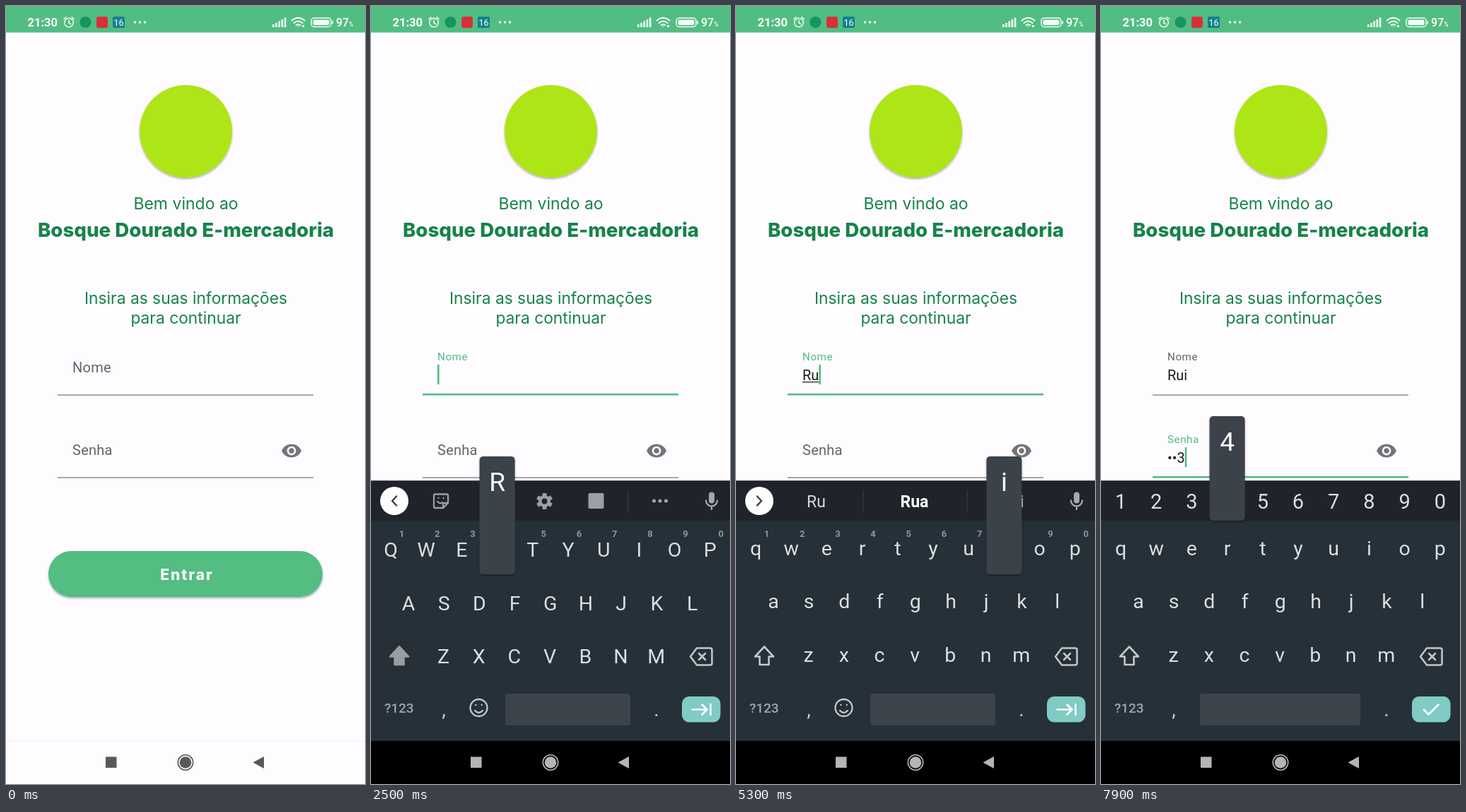
Recreate the animation shown at these times as an HTML page. Size 508 px wide and 1102 px high, loop 8000 ms.

```html
<!DOCTYPE html>
<html lang="pt-BR">
<head>
<meta charset="utf-8">
<title>Login</title>
<style>
html, body { margin: 0; width: 100%; height: 100%; overflow: hidden; background: #fefcff; }
svg { display: block; width: 508px; height: 1102px; font-family: Roboto, sans-serif; }
.brand { font-family: Inter, sans-serif; fill: #17834a; text-anchor: middle; }
.mid { text-anchor: middle; }
.line { fill: none; stroke-linecap: round; stroke-linejoin: round; }
text { white-space: pre; }
</style>
</head>
<body>
<svg viewBox="0 0 508 1102">
  <defs>
    <filter id="shadow" x="-20%" y="-20%" width="140%" height="150%">
      <feDropShadow dx="0" dy="2" stdDeviation="1.6" flood-color="#000" flood-opacity=".32"/>
    </filter>
  </defs>
  <rect width="508" height="1102" fill="#fefcff"/>

  <g id="status">
    <rect width="508" height="37.6" fill="#52bd82"/>
    <text x="30.5" y="29" font-size="16.5" font-weight="700" fill="#fff">21:30</text>
    <g class="line" stroke="#f2fff7" stroke-width="1.5">
      <circle cx="89" cy="23.5" r="6.3"/>
      <path d="M89 20v4l2.8 1.6M82 18.4l3-2.6M96 18.4l-3-2.6"/>
    </g>
    <circle cx="112.5" cy="23" r="8" fill="#15965f"/>
    <rect x="128" y="15" width="16" height="16" rx="3" fill="#d92f38"/>
    <rect x="151" y="15" width="17" height="16" rx="2" fill="#11828c"/>
    <text x="159.5" y="27.5" font-size="12.5" fill="#fff" class="mid">16</text>
    <g fill="#f2fff7">
      <circle cx="182.5" cy="23" r="1.7"/><circle cx="189.5" cy="23" r="1.7"/><circle cx="196.5" cy="23" r="1.7"/>
      <path d="M377 26h2.6v4h-2.6zM381.2 24h2.6v6h-2.6zM385.4 21.5h2.6v8.5h-2.6zM389.6 19h2.6v11h-2.6zM393.8 16.5h2.6v13.5h-2.6z"/>
    </g>
    <g class="line" stroke="#f2fff7" stroke-width="2">
      <path d="M404.5 20.5q9-7.5 18 0M407.5 24q6-5 12 0M410.5 27.2q3-2.5 6 0"/>
      <rect x="432" y="17" width="28" height="12.5" rx="4" stroke-width="1.5"/>
    </g>
    <rect x="434.5" y="19.5" width="23" height="7.5" rx="2" fill="#f2fff7"/>
    <path d="M461.5 21h1.5v4.5h-1.5zM412.3 28.5h2.4l-1.2 1.7zM419 27h3v3h-3z" fill="#f2fff7"/>
    <text x="467" y="29" font-size="16" font-weight="500" fill="#fff">97<tspan font-size="8.5">%</tspan></text>
  </g>

  <circle cx="254.5" cy="177.5" r="65.5" fill="#aee512" filter="url(#shadow)"/>
  <g class="brand">
    <text x="254.5" y="288" font-size="23">Bem vindo ao</text>
    <text x="254.5" y="326.5" font-size="27.7" font-weight="800">Bosque Dourado E-mercadoria</text>
    <text x="254.5" y="422" font-size="22.8">Insira as suas informações</text>
    <text x="254.5" y="449.5" font-size="22.8">para continuar</text>
  </g>

  <g id="fields"></g>
  <path transform="translate(388.8 614.8) scale(1.27)" fill="#757478" d="M12 4.5C7 4.5 2.73 7.61 1 12c1.73 4.39 6 7.5 11 7.5s9.27-3.11 11-7.5c-1.73-4.39-6-7.5-11-7.5zM12 17c-2.76 0-5-2.24-5-5s2.24-5 5-5 5 2.24 5 5-2.24 5-5 5zm0-8c-1.66 0-3 1.34-3 3s1.34 3 3 3 3-1.34 3-3-1.34-3-3-3z"/>

  <rect x="60" y="772" width="388" height="65" rx="32.5" fill="#52bd82" filter="url(#shadow)"/>
  <text x="256" y="813" class="brand" font-size="21" font-weight="800" letter-spacing="2" style="fill:#f7fffa">Entrar</text>
  <path d="M0 1041h508" stroke="#f0eef1"/>

  <g id="board">
    <rect y="672.6" width="508" height="430" fill="#000"/>
    <rect y="672.6" width="508" height="368.4" fill="#263038"/>
    <rect y="672.6" width="508" height="56.8" fill="#20232a"/>
    <rect id="delBg" x="432" y="889" width="70" height="63" fill="#3b434a"/>
    <g id="strip"></g>
    <g id="keys" class="mid" fill="#dbdfe1"></g>
    <path id="shift" class="line" stroke-width="2.6" d="M40 907.5L53 921.5H46.5V933H33.5V921.5H27Z"/>
    <path class="line" stroke="#c3c8ca" stroke-width="2.5" d="M461 909.5H480Q482.5 909.5 482.5 912V931Q482.5 933.5 480 933.5H461L452 921.5ZM464 917l9 9m0-9l-9 9"/>
    <text x="19" y="1000.5" font-size="19" font-weight="500" fill="#a0a6aa">?123</text>
    <g class="mid" font-size="28" fill="#c9cdcf"><text x="103" y="1006">,</text><text x="404" y="1006">.</text></g>
    <g id="smile" class="line" stroke="#c3c8ca" stroke-width="2.3">
      <circle cx="152.5" cy="994" r="12"/><path d="M147 998q5.5 6 11 0M148.3 990h.1M156.7 990h.1"/>
    </g>
    <rect id="space" y="974" height="45" rx="4" fill="#3c434a"/>
    <rect x="440" y="978" width="54.5" height="36.5" rx="10" fill="#80cbc4"/>
    <path id="enter" class="line" stroke="#fff" stroke-width="2.7"/>
  </g>

  <g id="nav" fill="currentColor">
    <rect x="141" y="1063.5" width="15.5" height="15.5"/>
    <circle cx="254" cy="1071.5" r="8.3"/>
    <circle cx="254" cy="1071.5" r="10.7" fill="none" stroke="currentColor" stroke-width="1.6"/>
    <path d="M349.5 1071.5L365 1063V1080Z"/>
  </g>
  <g id="popup"></g>
</svg>
<script>
const LOOP = 8000, TICK = 100, GREEN = '#52bd82', GREY = '#7f7d81';
const $ = id => document.getElementById(id);
const clamp = v => Math.max(0, Math.min(1, v));
const ROWS = [
  { chars: '1234567890', x: 28, top: 672, bottom: 729 },
  { chars: 'qwertyuiop', x: 28, top: 729, bottom: 805, base: 777.5 },
  { chars: 'asdfghjkl', x: 53, top: 805, bottom: 880, base: 853 },
  { chars: 'zxcvbnm', x: 102.5, top: 880, bottom: 956, base: 928.5 }
];
const PITCH = 50.2;
const FOCUS_NAME = 1400, FOCUS_PASS = 5800, SLIDE = 1700;
const R_WORDS = ['R', 'Rs', 'Re'];

// [time, changes]; "beat" restarts the caret blink
const STEPS = [
  [0, { name: '', pass: '', field: '', strip: 'tools', upper: true, pop: '', del: false, beat: 0 }],
  [FOCUS_NAME, { field: 'name', beat: FOCUS_NAME }],
  [2500, { pop: 'R' }],
  [2600, { name: 'R', pop: '', upper: false, strip: R_WORDS, beat: 2600 }],
  [3100, { pop: 'd' }],
  [3200, { name: 'Rd', pop: '', strip: ['Rd', 'RD', 'Ed'], beat: 3200 }],
  [4500, { del: true }],
  [4700, { name: 'R', del: false, strip: R_WORDS, beat: 4700 }],
  [5000, { pop: 'u' }],
  [5100, { name: 'Ru', pop: '', strip: ['Ru', 'Rua', 'Rui'], beat: 5100 }],
  [5300, { pop: 'i' }],
  [5400, { name: 'Rui', pop: '', strip: ['Rui', 'Ruim', 'Ruiva'], beat: 5400 }],
  [FOCUS_PASS, { field: 'pass', strip: 'digits', beat: FOCUS_PASS }],
  [7300, { pop: '1' }],
  [7400, { pass: '1', pop: '', beat: 7400 }],
  [7500, { pop: '2' }],
  [7600, { pass: '•2', pop: '', beat: 7600 }],
  [7700, { pop: '3' }],
  [7800, { pass: '••3', pop: '', beat: 7800 }],
  [7900, { pop: '4' }]
];

const label = (x, y, s, size, extra = '') => `<text x="${x}" y="${y}" font-size="${size}" ${extra}>${s}</text>`;
const bar = (x, y, w, h, fill, extra = '') => `<rect x="${x}" y="${y}" width="${w}" height="${h}" fill="${fill}" ${extra}/>`;
const stateAt = t => Object.assign({}, ...STEPS.filter(([at]) => at <= t).map(([, s]) => s));

// y is the underline position; lift goes from resting to floating label
function field(id, title, text, y, lift, active, caretOn, lineColor) {
  const size = 20 - 4.8 * lift;
  let out = label(94, y - 32 - 17 * lift, title, size,
    `letter-spacing="${.25 + .3 * lift}" fill="${active ? GREEN : '#666468'}"`);
  out += label(94, y - 21, text, 20, `id="${id}" fill="#1c1b1e"`);
  out += active ? bar(73, y - 2.1, 362, 2.6, GREEN) : bar(73, y - .6, 362, 1.3, lineColor);
  if (active && caretOn) out += bar(94, y - 43, 2.6, 28, GREEN, 'id="caret"');
  return out;
}

function drawFields(s, t) {
  const on = (t - s.beat) % 1000 < 500;
  const lift = from => clamp((t - from) / 150);
  const nameLine = t >= 5900 && t < 6100 ? '#8c8e70' : GREY;
  $('fields').innerHTML =
    field('name', 'Nome', s.name, 551, lift(FOCUS_NAME), s.field === 'name', on, nameLine) +
    field('pass', 'Senha', s.pass, 668, lift(FOCUS_PASS), s.field === 'pass', on, GREY);
  if (!s.field) return;
  const w = s[s.field] ? $(s.field).getComputedTextLength() : 0;
  if ($('caret')) $('caret').setAttribute('x', 94 + w);
  if (s.field === 'name' && w) $('fields').innerHTML += bar(94, 532, w, 1.2, '#1c1b1e');
}

const mic = `<rect x="478" y="688.5" width="8" height="16" rx="4" fill="#a3a8ab"/>
  <path class="line" stroke="#a3a8ab" stroke-width="2.3" d="M474 700.5a8 8 0 0 0 16 0M482 709v4"/>`;
const divider = x => bar(x, 686, 1, 31, '#3a4046');
const chevron = d => `<circle cx="33" cy="701" r="20" fill="#fff"/>
  <path class="line" stroke="#3d4246" stroke-width="2.5" d="M${33 - 3 * d} 694.5l${6 * d} 6.5l${-6 * d} 6.5"/>`;

function gear(cx, cy) {
  const teeth = [0, 60, 120].map(a =>
    bar(cx - 3, cy - 11.5, 6, 23, '#9aa0a3', `rx="1" transform="rotate(${a} ${cx} ${cy})"`)).join('');
  return `${teeth}<circle cx="${cx}" cy="${cy}" r="6.2" fill="#20232a" stroke="#9aa0a3" stroke-width="4.6"/>`;
}

const tools = () => chevron(-1) + `
  <path class="line" stroke="#9aa0a3" stroke-width="2.3" d="M91 691.5H107Q109 691.5 109 693.5V704L102 711H91Q89 711 89 709V693.5Q89 691.5 91 691.5ZM109 704H104Q102 704 102 706V711M94 702q4 4 7 1M95.5 697h.1M102.5 697h.1"/>` +
  label(172, 707, 'GIF', 17.5, 'class="mid" font-weight="900" letter-spacing=".8" fill="#9aa0a3"') +
  gear(245.5, 701.5) + bar(307.5, 690, 22, 22, '#9aa0a3', 'rx="2"') + divider(363) +
  [400.5, 409, 417.5].map(x => `<circle cx="${x}" cy="701" r="2.5" fill="#a3a8ab"/>`).join('') + mic;

const words = list => chevron(1) + divider(179.5) + divider(326.5) + mic + '<g class="mid" fill="#d5d9db">' +
  list.map((w, i) => label([113.5, 252.5, 391.5][i], 710, w, 23, i === 1 ? 'font-weight="700" fill="#fff"' : '')).join('') + '</g>';

const digits = () => '<g class="mid" fill="#dbdfe1">' +
  [...ROWS[0].chars].map((c, i) => label(28 + PITCH * i, 712, c, 29)).join('') + '</g>';

function drawBoard(s, t) {
  const shown = t >= SLIDE, secret = s.field === 'pass';
  const rest = 1 - clamp((t - SLIDE) / 300);
  $('board').style.display = shown ? '' : 'none';
  $('board').setAttribute('transform', `translate(0 ${430 * rest ** 1.84})`);
  $('nav').style.color = shown ? '#b5b5b5' : '#59585b';
  $('strip').innerHTML = s.strip === 'tools' ? tools() : s.strip === 'digits' ? digits() : words(s.strip);
  $('keys').innerHTML = ROWS.slice(1).map(r => [...r.chars].map((c, i) =>
    label(r.x + PITCH * i, r.base + (s.upper ? 2.5 : 0), s.upper ? c.toUpperCase() : c, 28.5)).join('')).join('') +
    (secret ? '' : [...ROWS[0].chars].map((c, i) =>
      label(43.5 + PITCH * i, 752, c, 13, 'font-weight="700" fill="#8f969a"')).join(''));
  $('shift').style.fill = s.upper ? '#9a9ea1' : 'none';
  $('shift').style.stroke = s.upper ? '#9a9ea1' : '#c3c8ca';
  $('delBg').style.display = s.del ? '' : 'none';
  $('smile').style.display = secret ? 'none' : '';
  $('space').setAttribute('x', secret ? 140 : 190);
  $('space').setAttribute('width', secret ? 227 : 177);
  $('enter').setAttribute('d', secret ? 'M457 997l6.5 6.5l14-14' : 'M454.5 996.5H475M468.5 989.5l7 7l-7 7M480.5 989v15');
}

function drawPopup(c) {
  const r = c && ROWS.find(row => row.chars.includes(c.toLowerCase()));
  if (!r) return $('popup').innerHTML = '';
  const x = r.x + PITCH * r.chars.indexOf(c.toLowerCase()), y = r.top - 91;
  $('popup').innerHTML = bar(x - 25, y, 50, r.bottom - y, '#3b434a', 'rx="5" filter="url(#shadow)"') +
    label(x, y + 49, c, 37, 'class="mid" fill="#fff"');
}

let last = -1;
const start = performance.now();
function frame() {
  const t = Math.floor((performance.now() - start) % LOOP / TICK) * TICK;
  if (t !== last) {
    const s = stateAt(t);
    drawFields(s, t);
    drawBoard(s, t);
    drawPopup(s.pop);
    last = t;
  }
  requestAnimationFrame(frame);
}
frame();
</script>
</body>
</html>
```
